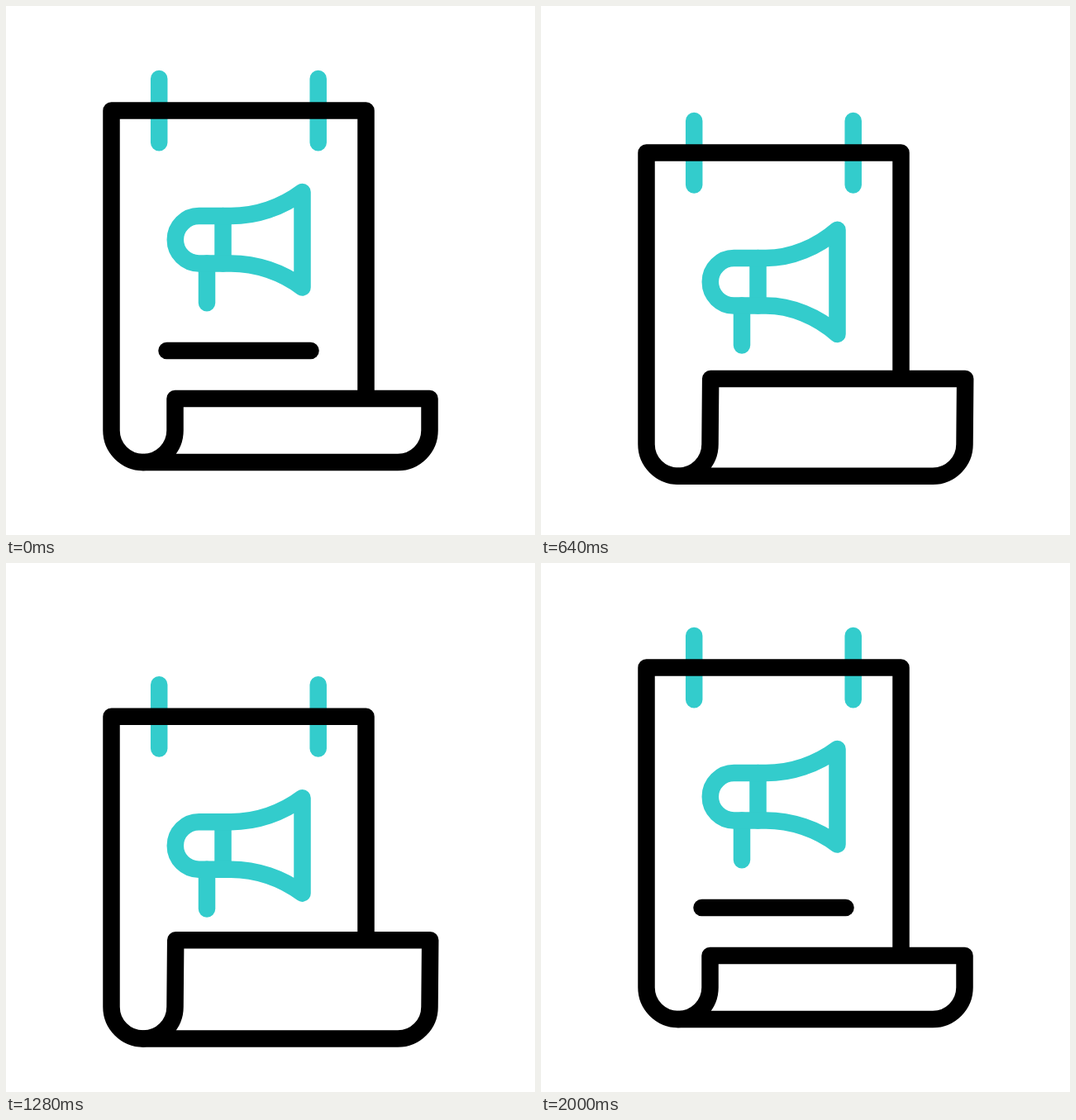
These frames come from a looping animation (640x640 px, 2.04 s). An HTML page:

```html
<!DOCTYPE html>
<html lang="en">
<head>
<meta charset="utf-8">
<title>Announcement scroll</title>
<style>
  html, body { margin: 0; width: 100%; height: 100%; overflow: hidden; background: #fff; }
  svg { display: block; width: 100vw; height: 100vh; }
  path { fill: none; stroke: #000; stroke-width: 20.5; stroke-linecap: round; stroke-linejoin: round; }
  .accent path { stroke: #3cc; }
  #fold { fill: #fff; }
</style>
</head>
<body>
<svg viewBox="0 0 640 640">
  <g id="sheet">
    <g class="accent">
      <path d="M185.2 88V165.3M377.7 88V165.3"/>
      <path d="M262.5 254V311.5M243 311.5V359.3"/>
      <path id="horn"/>
    </g>
    <path id="rule"/>
  </g>
  <path id="page"/>
  <path id="fold"/>
</svg>
<script>
const LOOP = 2040;
const [sheet, horn, rule, page, fold] =
  ['sheet', 'horn', 'rule', 'page', 'fold'].map(id => document.getElementById(id));

// Progress from 0 to 1 between two times, eased like cubic-bezier(x1, 0, x2, 1).
function ease(start, end, x1, x2) {
  return t => {
    const x = Math.min(1, Math.max(0, (t - start) / (end - start)));
    let low = 0, high = 1;
    for (let i = 0; i < 24; i++) {
      const s = (low + high) / 2, r = 1 - s;
      if (3 * s * r * r * x1 + 3 * s * s * r * x2 + s ** 3 < x) low = s;
      else high = s;
    }
    return low * low * (3 - 2 * low);
  };
}

// Rises to a peak, then returns to rest.
const swing = (peak, rise, fall) => t => peak * (rise(t) - fall(t));

const drop = swing(67, ease(0, 1000, 0.66, 0.42), ease(1000, 2000, 0.64, 0.17));
const sink = swing(26.5, ease(0, 1000, 0.59, 0.61), ease(1000, 2000, 0.59, 0.41));
const grow = swing(46, ease(0, 900, 0.81, 0.34), ease(1000, 1900, 0.85, 0.07));
const trim = swing(87, ease(300, 1000, 0.7, 0.1), ease(1000, 1800, 0.98, 0.09));
const flare = swing(8, ease(400, 800, 0.42, 0.58), ease(800, 1160, 0.42, 0.58));

function draw(t) {
  const y = drop(t), base = 552 + sink(t), height = 77 + grow(t);
  const top = base - height, bend = base - 38.5, lean = grow(t) / 60;
  const wide = flare(t), half = 87 - trim(t);

  sheet.setAttribute('transform', `translate(0 ${y})`);
  horn.setAttribute('d', `M272 254H233.5A28.75 28.75 0 0 0 233.5 311.5H272
    C303 311.5 334 ${322 + wide / 2} 358.5 ${340.5 + wide}V${225 - wide}
    C334 ${243.5 - wide / 2} 303 254 272 254Z`);
  rule.setAttribute('d', `M${281.5 - half} 417H${281.5 + half}`);
  page.setAttribute('d', `M435.5 ${top}V${126.5 + y}H127.5V${bend}A38.5 38.5 0 0 0 166 ${base}`);
  fold.setAttribute('d', `M${204.5 + lean} ${top}H${512.5 + lean}L512.5 ${bend}
    A38.5 38.5 0 0 1 474 ${base}H166A38.5 38.5 0 0 0 204.5 ${bend}Z`);
}

function tick() {
  draw(performance.now() % LOOP);
  requestAnimationFrame(tick);
}
tick();
</script>
</body>
</html>
```
